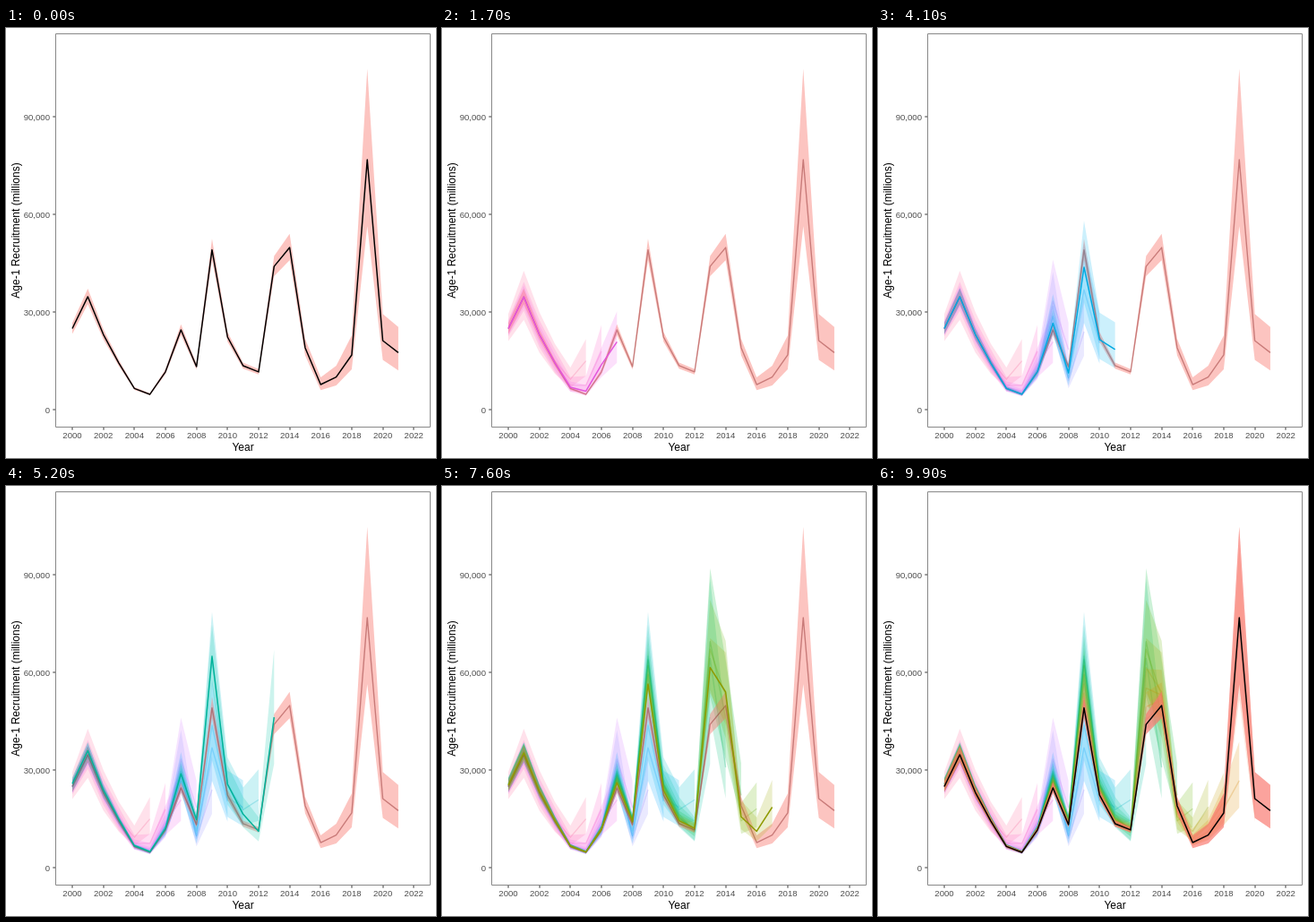
An HTML page with a canvas that plays this animation: 480x480 px, repeating every 10 s.

```html
<!DOCTYPE html>
<html lang="en">
<head>
<meta charset="utf-8">
<title>Age-1 recruitment by assessment year</title>
<style>
  html, body { margin: 0; width: 100%; height: 100%; overflow: hidden; background: #fff; }
  canvas { display: block; width: 480px; height: 480px; }
</style>
</head>
<body>
<canvas id="chart" width="480" height="480"></canvas>
<script>
const ctx = document.getElementById('chart').getContext('2d');
const LOOP = 10000, FIRST_YEAR = 2000, FIRST_PEEL = 2005, LAST_PEEL = 2021;
const STEPS = LAST_PEEL - FIRST_PEEL + 1;

// Final estimates in thousands of millions, one per year from 2000.
const BASE = [24.9, 34.7, 23.1, 14.3, 6.5, 4.7, 11.6, 24.5, 13.2, 49.1, 22.3,
  13.5, 11.6, 44, 49.8, 19, 7.7, 10, 16.8, 76.8, 21.2, 17.5];
const TYPICAL = 20;

// Year classes that were overestimated for long, or jumped in the second assessment.
const LIFT = { 2009: 1, 2013: 2.8, 2014: 0.9 };
const JUMP = { 2007: 0.45, 2008: -0.4, 2012: -0.3, 2015: -0.32, 2019: 0.42 };

const xOf = year => 74 + (year - FIRST_YEAR) * 17.33;
const yOf = value => 426 - value * 3.633;

// Polar CIELUV with chroma 100.
function hueColor(degrees, L = 65) {
  const h = degrees * Math.PI / 180, C = 100;
  const Y = ((L + 16) / 116) ** 3;
  const u = C * Math.cos(h) / (13 * L) + 0.19784;
  const v = C * Math.sin(h) / (13 * L) + 0.46834;
  const X = 9 * Y * u / (4 * v), Z = -X / 3 - 5 * Y + 3 * Y / v;
  const channel = c => {
    const g = c > 0.00304 ? 1.055 * c ** (1 / 2.4) - 0.055 : 12.92 * c;
    return Math.round(255 * Math.min(1, Math.max(0, g)));
  };
  return `rgb(${channel(3.2405 * X - 1.5372 * Y - 0.4985 * Z)},` +
    `${channel(-0.9693 * X + 1.876 * Y + 0.0416 * Z)},` +
    `${channel(0.0556 * X - 0.204 * Y + 1.0573 * Z)})`;
}

// Ratio of upper bound to estimate: wide for recent years, narrow after `hold` years.
const spread = (age, hold, power) =>
  1.07 + 0.28 / (1 + (age / hold) ** power) + 0.1 * Math.exp(-age);

function makeSeries(values, hold, power, hue) {
  const last = values.length - 1;
  const points = side => values.map((v, i) =>
    [xOf(FIRST_YEAR + i), yOf(v * spread(last - i, hold, power) ** side)]);
  const trace = (path, pts) => pts.forEach(p => path.lineTo(...p));
  const line = new Path2D(), band = new Path2D();
  trace(line, points(0));
  trace(band, [...points(1), ...points(-1).reverse()]);
  band.closePath();
  return { line, band, fill: hueColor(hue), stroke: hueColor(hue, 60) };
}

// Strength of the overestimation that starts in 2012 and eases out.
function liftAt(peel) {
  const t = (peel - 2012) / 9;
  return t < 0 ? 0 : 0.36 * (1 - t * t * (3 - 2 * t));
}

// A first estimate lies near the typical value and approaches the final one.
function estimate(year, peel) {
  const final = BASE[year - FIRST_YEAR], age = peel - year;
  const pull = 0.8 * 0.4 ** age;
  const lift = liftAt(peel) * (LIFT[year] ?? (year < 2007 ? 0.1 : 0.45));
  const jump = (JUMP[year] ?? 0) * age * Math.exp(1 - age);
  return final * (TYPICAL / final) ** pull * (1 + lift) * (1 + jump);
}

function makePeel(peel) {
  const values = BASE.slice(0, peel - FIRST_YEAR + 1).map((_, i) => estimate(FIRST_YEAR + i, peel));
  return makeSeries(values, 3 + 1.5 / (peel - 2004), 4, 355 - 22 * (peel - FIRST_PEEL));
}

const base = makeSeries(BASE, 5.5, 12, 15);
const peels = Array.from({ length: STEPS - 1 }, (_, i) => makePeel(FIRST_PEEL + i));

function fillBand(series, alpha) {
  ctx.globalAlpha = alpha;
  ctx.fillStyle = series.fill;
  ctx.fill(series.band);
  ctx.globalAlpha = 1;
}

function strokeLine(series, color, width, alpha = 1) {
  ctx.globalAlpha = alpha;
  ctx.strokeStyle = color;
  ctx.lineWidth = width;
  ctx.stroke(series.line);
  ctx.globalAlpha = 1;
}

function text(label, x, y, size, color, align) {
  ctx.font = `${size}px "Liberation Sans", Arial, sans-serif`;
  ctx.fillStyle = color;
  ctx.textAlign = align;
  ctx.fillText(label, x, y);
}

function tickMark(x, y, w, h) {
  ctx.fillStyle = '#333';
  ctx.fillRect(x, y, w, h);
}

function drawAxes() {
  ctx.strokeStyle = '#888';
  ctx.lineWidth = 1;
  ctx.strokeRect(55.5, 6.5, 418, 439);
  for (let year = 2000; year <= 2022; year += 2) {
    const x = xOf(year);
    tickMark(Math.round(x) - 0.5, 446, 1, 2.7);
    text(year, x, 458, 9.6, '#4d4d4d', 'center');
  }
  for (let value = 0; value <= 90; value += 30) {
    const y = yOf(value);
    tickMark(52.3, Math.round(y) - 0.5, 2.7, 1);
    text(value ? value + ',000' : '0', 49, y + 3.5, 9.6, '#4d4d4d', 'right');
  }
  text('Year', 264.5, 472, 12, '#000', 'center');
  ctx.save();
  ctx.translate(15, 226);
  ctx.rotate(-Math.PI / 2);
  text('Age-1 Recruitment (millions)', 0, 0, 12, '#000', 'center');
  ctx.restore();
}

function draw(step) {
  ctx.fillStyle = '#fff';
  ctx.fillRect(0, 0, 480, 480);

  for (const peel of peels.slice(0, Math.max(0, step - 1))) {
    fillBand(peel, 0.2);
    strokeLine(peel, peel.stroke, 1.4, 0.25);
  }
  fillBand(base, 0.43);
  if (step === STEPS) fillBand(base, 0.43);

  const current = peels[step - 1];
  if (current) {
    strokeLine(base, 'rgb(150,50,50)', 1.4, 0.5);
    fillBand(current, 0.2);
    strokeLine(current, current.stroke, 1.5);
  } else {
    strokeLine(base, '#000', 1.5);
  }
  drawAxes();
}

const startOf = step => Math.min(9900, Math.floor(LOOP * step / STEPS / 100) * 100);
let shown = -1;

function tick(now) {
  const t = now % LOOP;
  let step = STEPS;
  while (startOf(step) > t) step--;
  if (step !== shown) draw(shown = step);
  requestAnimationFrame(tick);
}

ctx.lineJoin = 'round';
draw(shown = 0);
requestAnimationFrame(tick);
</script>
</body>
</html>
```
